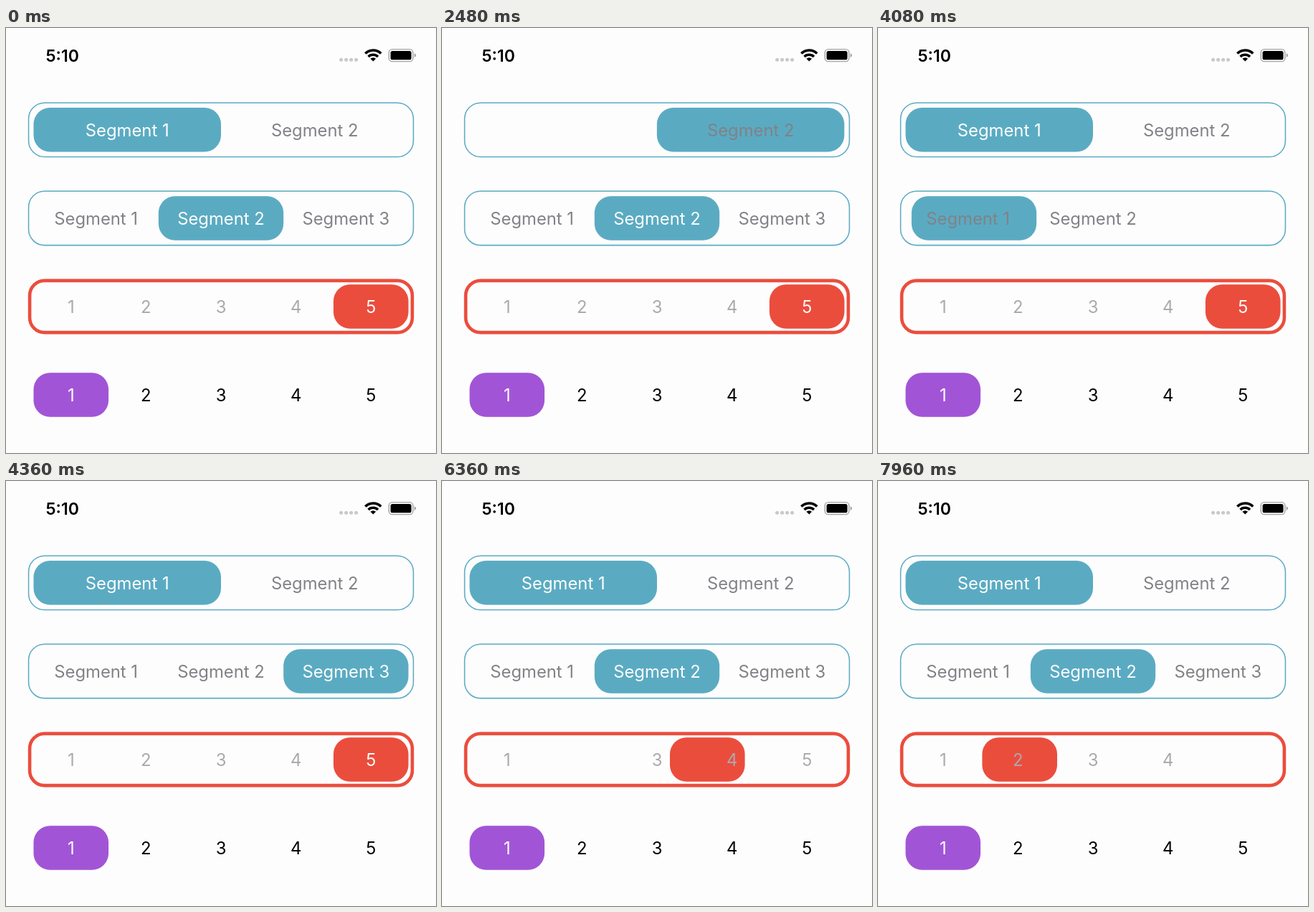
Write an HTML page that moves like this. It is 600 by 592 pixels and loops after 8 s.

```html
<!DOCTYPE html>
<html lang="en">
<head>
<meta charset="utf-8">
<title>Segmented controls</title>
<style>
  html, body { margin: 0; width: 100%; height: 100%; overflow: hidden; background: #fefdfe; }
  svg { display: block; width: 600px; height: 592px; font-family: Inter, Roboto, sans-serif; }
  .label { font-size: 15.5px; text-anchor: middle; }
</style>
</head>
<body>
<svg viewBox="0 0 600 592">
  <text x="55.5" y="46.7" font-size="23" font-weight="600">5:10</text>
  <g fill="#c9c8cb">
    <circle cx="467.6" cy="44.3" r="2.5"/><circle cx="474.6" cy="44.3" r="2.5"/>
    <circle cx="481.6" cy="44.3" r="2.5"/><circle cx="488.6" cy="44.3" r="2.5"/>
  </g>
  <g transform="translate(512.3 46.6)" fill="none" stroke="#000" stroke-width="3.5">
    <path d="M-11 -11A15.5 15.5 0 0 1 11 -11M-6.7 -6.7A9.5 9.5 0 0 1 6.7 -6.7"/>
    <path d="M0 0L-3.8 -3.8A5.4 5.4 0 0 1 3.8 -3.8Z" fill="#000" stroke="none"/>
  </g>
  <rect x="534.3" y="29.6" width="33.6" height="17" rx="4.6" fill="none" stroke="#a3a2a5" stroke-width="1.4"/>
  <rect x="536.6" y="31.9" width="29" height="12.4" rx="2.6"/>
  <path d="M569.7 35.2Q572.2 36.2 572.2 38.1T569.7 41Z" fill="#a3a2a5"/>
  <g id="controls" transform="scale(1.53846)"></g>
</svg>
<script>
const LOOP = 8000, STEP = 40, DURATION = 300;
const LEFT = 20, WIDTH = 350, HEIGHT = 50, INSET = 5, TOP = 67.2, PITCH = 80, RADIUS = 15;

const rows = [
  { labels: ['Segment 1', 'Segment 2'], start: 0, color: '#5aabc2', text: '#828186', border: 1 },
  { labels: ['Segment 1', 'Segment 2', 'Segment 3'], start: 1, color: '#5aabc2', text: '#828186', border: 1 },
  { labels: ['1', '2', '3', '4', '5'], start: 4, color: '#eb4d3d', text: '#aaa9ad', border: 3 },
  { labels: ['1', '2', '3', '4', '5'], start: 0, color: '#a155d6', text: '#000', border: 0 }
];

// lead: how far (ms) the slide has run when it is first seen
const moves = [
  { at: 1440, row: 0, to: 1, lead: 16 },
  { at: 2480, row: 0, to: 0, lead: 5 },
  { at: 3280, row: 1, to: 0, lead: 5 },
  { at: 4080, row: 1, to: 2, lead: 33 },
  { at: 5040, row: 1, to: 1, lead: 20 },
  { at: 6240, row: 2, to: 1, lead: 20 },
  { at: 7040, row: 2, to: 0, lead: 34 },
  { at: 7880, row: 2, to: 4, lead: 25 }
];

const controls = document.getElementById('controls');

function add(tag, attributes) {
  const node = document.createElementNS('http://www.w3.org/2000/svg', tag);
  for (const name in attributes) node.setAttribute(name, attributes[name]);
  return controls.appendChild(node);
}

rows.forEach((row, i) => {
  const y = TOP + i * PITCH;
  row.cell = (WIDTH - 2 * INSET) / row.labels.length;
  if (row.border) {
    add('rect', {
      x: LEFT + row.border / 2, y: y + row.border / 2,
      width: WIDTH - row.border, height: HEIGHT - row.border, rx: RADIUS - row.border / 2,
      fill: 'none', stroke: row.color, 'stroke-width': row.border
    });
  }
  row.pill = add('rect', {
    y: y + INSET, width: row.cell, height: HEIGHT - 2 * INSET, rx: RADIUS, fill: row.color
  });
  row.nodes = row.labels.map((label, k) => {
    const node = add('text', {
      class: 'label', x: LEFT + INSET + (k + 0.5) * row.cell, y: y + HEIGHT / 2 + 5.7
    });
    node.textContent = label;
    return node;
  });
});

// cubic-bezier(.42, 0, .58, 1), solved for its parameter by bisection
function easeInOut(p) {
  if (p >= 1) return 1;
  let low = 0, high = 1;
  for (let i = 0; i < 24; i++) {
    const s = (low + high) / 2, r = 1 - s;
    if (1.26 * s * r * r + 1.74 * s * s * r + s * s * s < p) low = s; else high = s;
  }
  return low * low * (3 - 2 * low);
}

function draw(time) {
  rows.forEach((row, i) => {
    let selected = row.start, position = row.start;
    for (const move of moves) {
      if (move.row !== i || time < move.at) continue;
      const progress = easeInOut((time - move.at + move.lead) / DURATION);
      position = selected + (move.to - selected) * progress;
      selected = move.to;
    }
    row.pill.setAttribute('x', LEFT + INSET + position * row.cell);
    row.nodes.forEach((node, k) => node.setAttribute('fill', k === selected ? '#fefdfe' : row.text));
  });
}

const origin = performance.now();
function tick() {
  const time = (performance.now() - origin) % LOOP;
  draw(Math.floor(time / STEP) * STEP);
  requestAnimationFrame(tick);
}
tick();
</script>
</body>
</html>
```
